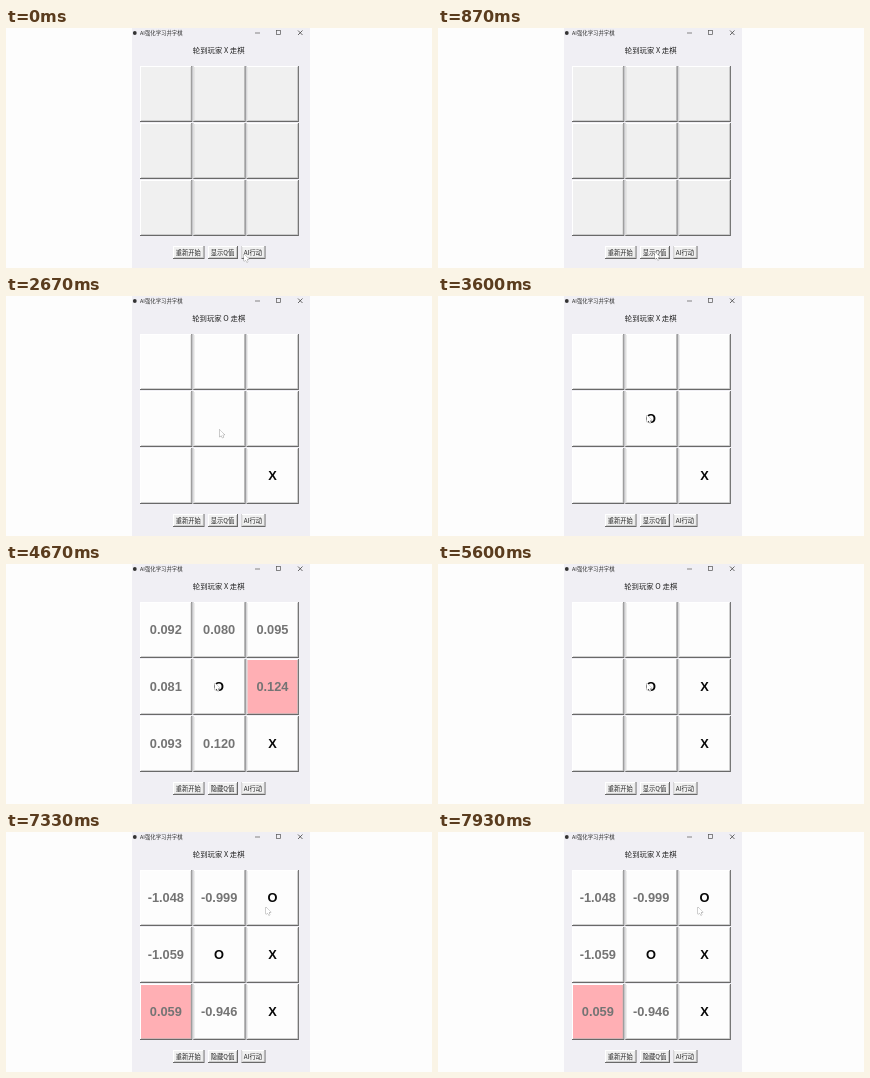
Animation of 426x240 px, one loop 8000 ms. Source, as an HTML page with a canvas:

```html
<!DOCTYPE html>
<html lang="zh-CN">
<head>
<meta charset="utf-8">
<style>
  html, body { margin: 0; width: 100%; height: 100%; overflow: hidden; background: #fdfdfd; }
  canvas { display: block; width: 426px; height: 240px; }
</style>
</head>
<body>
<canvas></canvas>
<script>
const LOOP = 8000;
const CJK = '"Noto Sans CJK SC", "Noto Sans CJK", sans-serif';
const ARIAL = '"Liberation Sans", sans-serif';
const canvas = document.querySelector('canvas');
const ctx = canvas.getContext('2d');
const scale = window.devicePixelRatio || 1;
canvas.width = 426 * scale;
canvas.height = 240 * scale;
ctx.scale(scale, scale);

// Board rows are separated by "/"; "!" marks the best move.
const states = [
  { at: 0, turn: 'X', board: ', , / , , / , , ', face: '#f0f0f0' },
  { at: 900, turn: 'X', board: '0.192!,0.160,0.192!/0.160,0.138,0.160/0.192!,0.160,0.192!', values: true },
  { at: 2050, turn: 'O', board: ', , / , , / , ,X' },
  { at: 3000, turn: 'X', board: ', , / ,O, / , ,X' },
  { at: 4150, turn: 'X', board: '0.092,0.080,0.095/0.081,O,0.124!/0.093,0.120,X', values: true },
  { at: 5150, turn: 'O', board: ', , / ,O,X/ , ,X' },
  { at: 6350, turn: 'X', board: ', ,O/ ,O,X/ , ,X' },
  { at: 7300, turn: 'X', board: '-1.048,-0.999,O/-1.059,O,X/0.059!,-0.946,X', values: true }
];

// Pointer path: time, x, y
const pointerPath = [
  [0, 238, 226], [250, 238, 226], [650, 217, 224], [1050, 217, 224],
  [1500, 242, 224], [2250, 242, 224], [2800, 209, 119],
  [5700, 209, 119], [6200, 260, 75], [LOOP, 260, 75]
];

function rect(x, y, w, h, color) {
  ctx.fillStyle = color;
  ctx.fillRect(x, y, w, h);
}

function text(str, x, y, font, color = '#222', align = 'center') {
  ctx.font = font;
  ctx.fillStyle = color;
  ctx.textAlign = align;
  ctx.fillText(str, x, y);
}

function stroke(points, color, width, close) {
  ctx.beginPath();
  points.forEach(([x, y]) => ctx.lineTo(x, y));
  if (close) ctx.closePath();
  ctx.strokeStyle = color;
  ctx.lineWidth = width;
  ctx.stroke();
}

function raised(x, y, w, h, face) {
  rect(x, y, w, h, '#696969');
  rect(x, y, w - 1, h - 1, '#fff');
  rect(x + 1, y + 1, w - 2, h - 2, '#b4b4b4');
  rect(x + 1, y + 1, w - 2.6, h - 2.6, face);
}

function button(label, x, w) {
  raised(x, 218, w, 13, '#f0f0f0');
  text(label, x + w / 2 - 0.5, 226.6, '6.3px ' + CJK);
}

function drawWindow(state) {
  rect(0, 0, 426, 240, '#fdfdfd');
  rect(126, 0, 178, 240, '#f0eff4');
  ctx.fillStyle = '#333';
  ctx.beginPath();
  ctx.arc(128.8, 5, 1.9, 0, 7);
  ctx.fill();
  text('AI强化学习井字棋', 134, 7, '5.4px ' + CJK, '#333', 'left');
  stroke([[249, 5], [254, 5]], '#555', 0.7);
  ctx.strokeRect(270.5, 2.5, 4, 4);
  stroke([[292, 2.5], [296.5, 7]], '#444', 0.8);
  stroke([[296.5, 2.5], [292, 7]], '#444', 0.8);
  text(`轮到玩家 ${state.turn} 走棋`, 212.7, 25, '7.4px ' + CJK);
  button('重新开始', 167, 31.5);
  button(state.values ? '隐藏Q值' : '显示Q值', 202, 30);
  button('AI行动', 235.5, 24);
}

function drawBoard({ board, face = '#fdfdfd' }) {
  board.split('/').forEach((row, r) => row.split(',').forEach((cell, c) => {
    const x = 134 + c * 53.3, y = 38 + r * 57;
    raised(x, y, 52.3, 56, cell.endsWith('!') ? '#ffafb4' : face);
    const label = cell.replace('!', '').trim();
    const isMark = label === 'X' || label === 'O';
    text(label, x + 25.8, y + 32.2, 'bold 12.8px ' + ARIAL, isMark ? '#080808' : '#747474');
  }));
}

function pointerAt(t) {
  const i = pointerPath.findIndex(p => p[0] > t);
  const [t0, x0, y0] = pointerPath[i - 1], [t1, x1, y1] = pointerPath[i];
  const u = (t - t0) / (t1 - t0), k = u * u * (3 - 2 * u);
  return [x0 + (x1 - x0) * k, y0 + (y1 - y0) * k];
}

function drawPointer(t) {
  const [px, py] = pointerAt(t);
  const shape = [[0, 0], [0, 7.2], [1.7, 5.7], [2.8, 8.2], [3.9, 7.7], [2.8, 5.2], [5.1, 5.1]];
  stroke(shape.map(([x, y]) => [px + x, py + y]), '#777', 0.7, true);
  ctx.fillStyle = '#fff';
  ctx.fill();
}

function frame(now) {
  const t = now % LOOP;
  const state = states.findLast(s => s.at <= t);
  drawWindow(state);
  drawBoard(state);
  drawPointer(t);
  requestAnimationFrame(() => frame(performance.now()));
}
frame(0);
</script>
</body>
</html>
```
